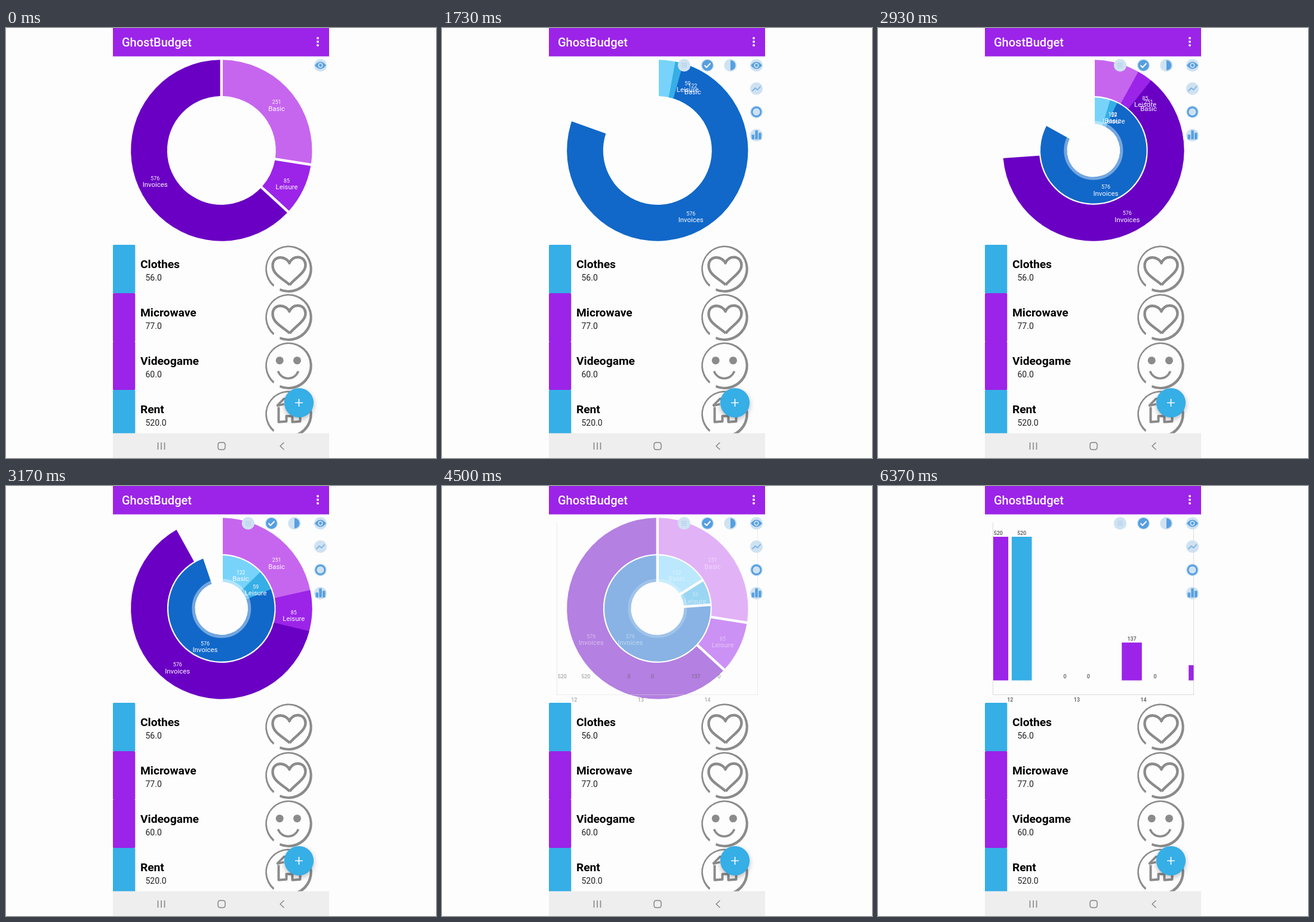
An HTML page with a canvas that plays this animation: 720 px wide and 720 px high, repeating every 6410 ms.

```html
<!DOCTYPE html>
<html lang="en">
<head>
<meta charset="utf-8">
<title>Budget charts</title>
<style>
  html, body { margin: 0; height: 100%; overflow: hidden; background: #fdfdfe; }
  canvas { display: block; width: 720px; height: 720px; }
</style>
</head>
<body>
<canvas id="stage" width="720" height="720"></canvas>
<script>
const c = document.getElementById('stage').getContext('2d');
const LOOP = 6410, TAU = Math.PI * 2;
const PAPER = '#fdfdfe', PURPLE = '#9b24e8', SKY = '#36aee6', GREY = '#8b8b8b';
const PALE = '#cfe2f2', STEEL = '#569fe0', WHITE = '#fdfaff', INK = '#555', NAV = '#858585';

const EXPECTED = [['Basic', 251, '#c666ee'], ['Leisure', 85, PURPLE], ['Invoices', 576, '#6a00c3']];
const ACTUAL = [['Basic', 122, '#78d3fa'], ['Leisure', 59, SKY], ['Invoices', 576, '#1168c8']];
const BARS = [[201.3, 520, PURPLE], [240.7, 520, SKY], [313, 0, PURPLE], [352.3, 0, SKY],
              [425, 137, PURPLE], [464, 0, SKY], [537, 55, PURPLE]];
const ROWS = [['Clothes', '56.0', SKY, heart], ['Microwave', '77.0', PURPLE, heart],
              ['Videogame', '60.0', PURPLE, smile], ['Rent', '520.0', SKY, house]];

const progress = (t, start, length) => Math.min(1, Math.max(0, (t - start) / length));
const easeOut = p => 1 - (1 - p) ** 2;

function text(str, x, y, font, color, align = 'left') {
  c.font = font + ' Roboto, sans-serif';
  c.fillStyle = color;
  c.textAlign = align;
  c.fillText(str, x, y);
}

function rect(x, y, w, h, color) {
  c.fillStyle = color;
  c.fillRect(x, y, w, h);
}

function disc(x, y, r, color) {
  c.fillStyle = color;
  c.beginPath();
  c.arc(x, y, r, 0, TAU);
  c.fill();
}

function stroke(d, width, color) {
  c.lineWidth = width;
  c.strokeStyle = color;
  c.stroke(new Path2D(d));
}

function at(x, y, draw) {
  c.save();
  c.translate(x, y);
  draw();
  c.restore();
}

// Slices keep their full sweep while their start angles spread out with the phase.
function donut(data, R, r, phase) {
  const gap = 2.2, total = data.reduce((sum, d) => sum + d[1], 0), labels = [];
  let before = 0;
  at(360.8, 205, () => {
    for (const [name, value, color] of data) {
      const a = before * phase - TAU / 4, sweep = value / total * TAU, b = a + sweep;
      c.fillStyle = color;
      c.beginPath();
      c.arc(0, 0, R, a + gap / R, b - gap / R);
      c.arc(0, 0, r, b - gap / r, a + gap / r, true);
      c.fill();
      labels.push([name, value, a + sweep / 2]);
      before += sweep;
    }
    if (r < 60) {
      c.lineWidth = 5;
      c.strokeStyle = 'rgba(255,255,255,.41)';
      c.beginPath();
      c.arc(0, 0, r + 2.5, 0, TAU);
      c.stroke();
    }
    for (const [name, value, mid] of labels) {
      const x = Math.cos(mid) * (R + r) / 2, y = Math.sin(mid) * (R + r) / 2 + 1;
      text(value, x, y, '8.9px', WHITE, 'center');
      text(name, x, y + 11.3, '11.4px', WHITE, 'center');
    }
  });
}

function barChart(phase) {
  stroke('M192.5 61V349.5H528.5V61', 1, '#dcdcdc');
  c.save();
  c.beginPath();
  c.rect(193, 50, 335.5, 300);
  c.clip();
  for (const [x, value, color] of BARS) {
    const h = value * phase * 240.5 / 520;
    rect(x - 16.8, 325.5 - h, 33.6, h, color);
    if (x < 528) text(value, x, 322 - h, '500 8.9px', INK, 'center');
  }
  c.restore();
  [12, 13, 14].forEach((n, i) => text(n, 221.3 + i * 111.6, 361.3, '500 8.9px', INK, 'center'));
}

function heart() {
  stroke('M1.500 26.500C-8 17-27 10-27-6C-27-15-21-19.500-14-19.500C-7-19.500-1-15 1-10' +
         'C4-17 9-20 15-20C23-20 28-14 28-7C28 6 13 13 1.500 26.500', 4.4, GREY);
}

function smile() {
  disc(-15.3, -9, 6.5, GREY);
  disc(14, -9, 6.5, GREY);
  stroke('M-18 9C-12 25 10 25 16 9', 3.6, GREY);
}

function house() {
  stroke('M-20-14L-8-26L8-27L21-15M-20-14L-8-17', 3.6, GREY);
  stroke('M-17-12V13L-4 12V3H6V13L19 12V-10', 4, GREY);
}

function brushRing() {
  const a = 131 * TAU / 360, b = 113 * TAU / 360 + TAU;
  c.fillStyle = GREY;
  c.beginPath();
  c.arc(0, 0, 39.3, a, b);
  c.arc(-.7, -.7, 35.9, b, a, true);
  c.fill();
}

function list() {
  ROWS.forEach(([name, price, color, icon], i) => {
    const y = 363 + i * 81;
    c.fillStyle = color;
    c.beginPath();
    c.roundRect(179, y, 37.3, 81, 1.5);
    c.fill();
    text(name, 225, y + 39, '700 19.2px', '#000');
    text(price, 233.5, y + 59.7, '14px', '#222');
    at(473.5, y + 40.7, () => { brushRing(); icon(); });
  });
}

const icons = {
  eye() {
    c.fillStyle = STEEL;
    c.fill(new Path2D('M-9.500 0Q0-12 9.500 0Q0 12-9.500 0Z'));
    disc(0, 0, 4.2, PALE);
    disc(0, 0, 2.4, STEEL);
  },
  all() {
    for (const x of [-3, 0, 3]) for (const y of [-3, 0, 3]) disc(x, y, .9, '#a3c8ea');
  },
  check() {
    disc(0, 0, 9.3, STEEL);
    stroke('M-5 0L-1.500 3.500L5-3.500', 2, WHITE);
  },
  half() {
    c.fillStyle = STEEL;
    c.beginPath();
    c.arc(0, 0, 8.5, -TAU / 4, TAU / 4);
    c.fill();
  },
  line() { stroke('M-7 4L-2-1L2 2L7-4', 1.8, '#7db3e2'); },
  ring() { stroke('M0-7.500A7.500 7.500 0 1 1-.1-7.500Z', 2.8, STEEL); },
  bars() {
    rect(-8, -1, 4.5, 8, STEEL);
    rect(-2.2, -8, 4.5, 15, STEEL);
    rect(3.6, -4, 4.5, 11, STEEL);
  }
};

function button(dx, dy, icon, open) {
  if (!open) return;
  at(526.5 + dx * open, 62.5 + dy * open, () => {
    c.globalAlpha = open;
    disc(0, 0, 10.6, PALE);
    icon();
  });
}

function menu(open) {
  button(-121, 0, icons.all, open);
  button(-82, 0, icons.check, open);
  button(-43.5, 0, icons.half, open);
  button(0, 39, icons.line, open);
  button(0, 78, icons.ring, open);
  button(0, 117, icons.bars, open);
  button(0, 0, icons.eye, 1);
}

function frame() {
  rect(179, 0, 362, 47.5, PURPLE);
  text('GhostBudget', 194, 30.6, '500 20px', WHITE);
  for (const y of [17, 23, 29]) disc(522, y, 2, WHITE);

  c.save();
  c.shadowColor = 'rgba(0,0,0,.28)';
  c.shadowBlur = 8;
  c.shadowOffsetY = 3;
  disc(490.5, 627.5, 24.6, SKY);
  c.restore();
  stroke('M484 627.500H497M490.500 621V634', 1.7, WHITE);

  rect(179, 678.5, 362, 41.5, '#eeeeef');
  stroke('M254.500 694V706M260 694V706M265.500 694V706', 1.6, NAV);
  stroke('M359 694H363Q367 694 367 698V702Q367 706 363 706H359Q355 706 355 702V698Q355 694 359 694Z', 1.5, NAV);
  stroke('M465.500 694L459 700L465.500 706', 1.5, NAV);
}

function charts(t) {
  const fade = progress(t, 4400, 200);
  if (fade < 1) {
    c.globalAlpha = 1 - fade;
    if (t < 1670) donut(EXPECTED, 151.7, 91, 1);
    else if (t < 2830) donut(ACTUAL, 151.7, 91, easeOut(progress(t, 1670, 640)));
    else {
      const phase = easeOut(progress(t, 2830, 640));
      donut(EXPECTED, 151.7, 91, phase);
      donut(ACTUAL, 88.8, 44.5, phase);
    }
  }
  if (fade) {
    c.globalAlpha = fade;
    barChart(easeOut(progress(t, 5840, 530)));
  }
  c.globalAlpha = 1;
}

function draw(now) {
  const t = now % LOOP;
  rect(0, 0, 720, 720, PAPER);
  charts(t);
  list();
  menu(easeOut(progress(t, 500, 300)));
  frame();
  requestAnimationFrame(draw);
}

c.lineJoin = 'round';
requestAnimationFrame(draw);
</script>
</body>
</html>
```
